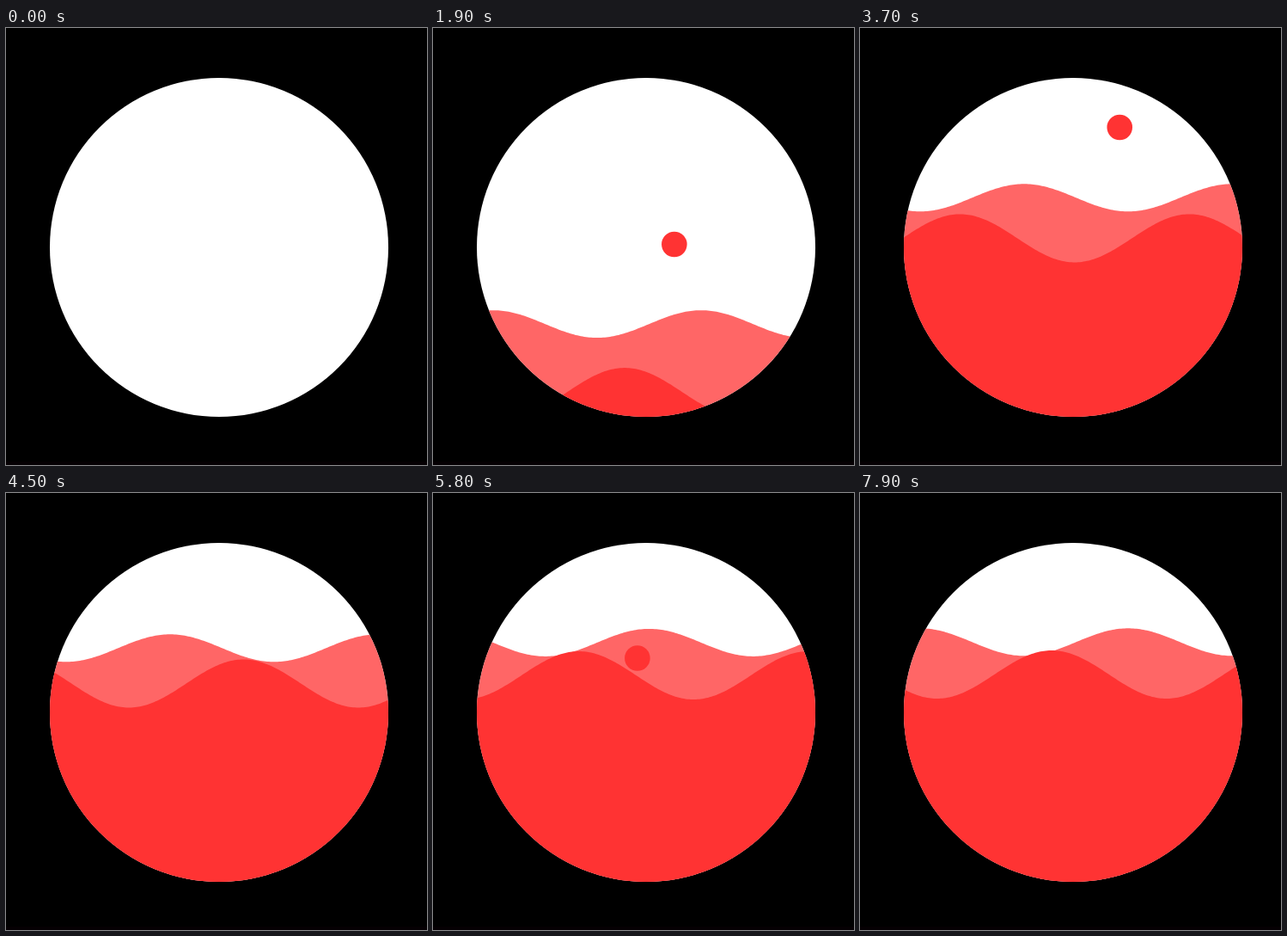
An HTML page with a canvas for the animation above (8 s loop, 490 px wide and 508 px high).

```html
<!DOCTYPE html>
<html lang="en">
<head>
<meta charset="utf-8">
<title>Filling circle</title>
<style>
  html, body { margin: 0; width: 100%; height: 100%; overflow: hidden; background: #000; }
  canvas { display: block; }
</style>
</head>
<body>
<canvas id="stage" width="490" height="508"></canvas>
<script>
const ctx = document.getElementById('stage').getContext('2d');
const LOOP = 8000, STEP = 100, TAU = Math.PI * 2;
const RED = '#ff3333', PINK = '#ff6666';

// rest: final level, rise: distance climbed, pace: steps; period: steps per wavelength
const back = { color: PINK, amp: 16, length: 242, crest: 130.5, period: 4,
               rest: 173.3, rise: 369, pace: 21.8 };
const front = { color: RED, amp: 28, length: 267, crest: 276.5, period: 5,
                rest: 211, rise: 438, pace: 22.5 };

function disc(x, y, r, color) {
  ctx.beginPath();
  ctx.arc(x, y, r, 0, TAU);
  ctx.fillStyle = color;
  ctx.fill();
}

function drawWave(w, n) {
  const mid = w.rest + w.rise * Math.exp(-Math.pow(n / w.pace, 1.9));
  const crest = w.crest + w.length * n / w.period;
  ctx.beginPath();
  ctx.moveTo(40, 508);
  for (let x = 40; x <= 456; x += 2) {
    ctx.lineTo(x, mid - w.amp * Math.cos((x - crest) / w.length * TAU));
  }
  ctx.lineTo(456, 508);
  ctx.fillStyle = w.color;
  ctx.fill();
}

// Once a second the ball drops in from the right, swinging wide every third time
function drawBall(n) {
  const p = n % 10 - 7;
  if (p < 0) return;
  const k = Math.floor(n / 10);
  const swing = Math.cos((k - 1) / 3 * TAU);
  const x = 388 + 143.5 * swing - 14 * k / 3 - p * (77.7 + 45.3 * swing);
  const y = 115.5 + 85 * p - 8.5 * p * p;
  disc(x, y, 14.8, RED);
}

function draw(n) {
  ctx.fillStyle = '#000';
  ctx.fillRect(0, 0, 490, 508);
  ctx.fillStyle = '#050003';
  ctx.fillRect(0, 504, 490, 4);
  ctx.save();
  disc(248, 255, 197, '#fff');
  ctx.clip();
  drawWave(back, n);
  drawBall(n);
  drawWave(front, n);
  ctx.restore();
}

const start = performance.now();
function tick() {
  const t = (performance.now() - start) % LOOP;
  draw(Math.floor(t / STEP));
  requestAnimationFrame(tick);
}
tick();
</script>
</body>
</html>
```
